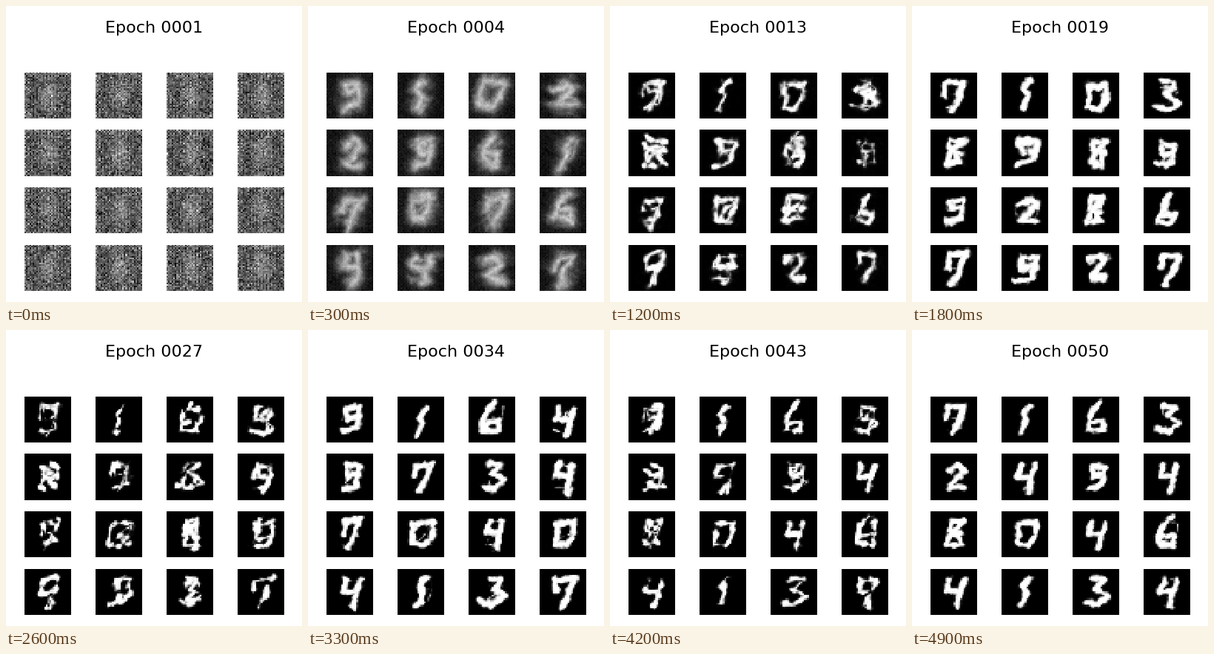
These frames come from a looping animation (400 px wide and 400 px high, 5.1 s). A matplotlib script:

```python
import matplotlib.pyplot as plt
import numpy as np
from matplotlib.animation import FuncAnimation

STAGE, DPI = 400, 100
EPOCHS, STEP_MS = 50, 100
N, CELLS, SIDE = 28, 16, 62.5

# Pen strokes of each digit on the 28 x 28 canvas, leaning like handwriting.
DIGITS = {
    "0": [[(10, 8), (21, 7), (20, 15), (16, 21), (9, 20), (10, 8)]],
    "1": [[(17, 6), (13, 11), (15, 15), (12, 22)]],
    "2": [[(11, 10), (17, 7), (20, 10), (11, 20), (20, 20)]],
    "3": [[(12, 6), (19, 7), (14, 12), (21, 17), (15, 22), (8, 20)]],
    "4": [[(12, 7), (10, 14), (18, 14)], [(20, 7), (16, 23)]],
    "6": [[(16, 4), (10, 12), (9, 20), (18, 21), (18, 15), (11, 16)]],
    "7": [[(10, 14), (11, 7), (21, 6), (17, 16), (13, 23)]],
    "8": [[(18, 14), (12, 12), (13, 7), (20, 7), (13, 14), (10, 21), (18, 20), (16, 14)]],
    "9": [[(20, 8), (12, 8), (13, 14), (19, 12)], [(20, 8), (18, 19), (10, 21)]],
}

# What the sixteen cells resemble as training goes on.
STAGES = {8: "9102296170764427", 19: "7103898992867927",
          34: "9164973470404137", 50: "7163249480464134"}

gx, gy = np.meshgrid(np.arange(N) + 0.5, np.arange(N) + 0.5)


def distance(digit, x, y):
    """Distance from the points (x, y) to the nearest stroke of a digit."""
    best = np.full_like(x, 99.0)
    for stroke in DIGITS[digit]:
        for (ax, ay), (bx, by) in zip(stroke, stroke[1:]):
            dx, dy = bx - ax, by - ay
            t = np.clip(((x - ax) * dx + (y - ay) * dy) / (dx * dx + dy * dy), 0, 1)
            best = np.minimum(best, np.hypot(x - ax - t * dx, y - ay - t * dy))
    return best


def ripple(rng, epoch, scale):
    """A smooth random field that drifts slowly with the epoch."""
    field = 0
    for _ in range(3):
        kx, ky = rng.normal(0, scale, 2)
        phase, speed = rng.uniform(0, 2 * np.pi), rng.normal(0, 0.25)
        field = field + np.sin(kx * gx + ky * gy + phase + speed * epoch)
    return field / 1.7


def grain(rng):
    """Fine noise, slightly blurred."""
    a = rng.normal(0, 1, (N, N))
    for axis in (0, 1):
        a = (np.roll(a, 1, axis) + 2 * a + np.roll(a, -1, axis)) / 4
    return a


def static(rng):
    """Untrained output: a bright middle, a pale checked rim and grain."""
    col, row = np.cos(np.pi * (gx - 0.5)), np.cos(np.pi * (gy - 0.5))
    glow = np.exp(-((gx - 15) / 5.5) ** 2 - ((gy - 14) / 10) ** 2)
    rim = np.exp(-np.minimum(gx, gy) / 1.5) + 0.5 * np.exp(-np.minimum(N - gx, N - gy))
    base = 0.31 + 0.24 * glow + 0.2 * rim + 0.04 * col + (0.04 + 0.1 * rim) * col * row
    return base + rng.normal(0, 0.12, (N, N))


def image(cell, epoch):
    shape, fine = np.random.default_rng(cell), np.random.default_rng([cell, epoch])
    early = max(0, 8 - epoch) / 7
    thin = 0.5 - 0.5 * np.cos(2 * np.pi * (epoch - 19) / 17)   # the pen swells and thins

    # Bend the canvas, less and less as training settles.
    bend = 0.4 + 1.3 * (1 - epoch / EPOCHS)
    x = gx + bend * ripple(shape, epoch, 0.2)
    y = gy + bend * ripple(shape, epoch, 0.2)

    # One digit wears away while the next one grows.
    marks = list(STAGES)
    start, end = next((a, b) for a, b in zip(marks, marks[1:]) if epoch <= b)
    mix = np.clip((epoch - start) / (end - start), 0, 1)
    dist = np.minimum(distance(STAGES[start][cell], x, y) + 2 * mix ** 2,
                      distance(STAGES[end][cell], x, y) + 2 * (1 - mix) ** 2)

    gaps = (0.2 + 0.6 * thin) * ripple(shape, epoch, 0.5)
    rough = grain(fine)
    width = 1.9 - 0.4 * thin + 0.8 * early
    soft = 0.22 + 0.35 * np.exp(-max(0, epoch - 8) / 5) + 2 * early
    edge = (dist + gaps + 0.9 * rough - width) / soft
    img = 1 / (1 + np.exp(np.clip(edge, -40, 40)))

    haze = 0.2 * np.exp(-abs(epoch - 8) / 5)
    img = img + haze * np.abs(rough) * np.exp(-dist / 4) * (0.5 + gx / N)
    noise = early ** 3
    return np.clip((1 - noise) * img + noise * static(fine), 0, 1)


fig = plt.figure(figsize=(STAGE / DPI, STAGE / DPI), dpi=DPI, facecolor="white")
title = fig.text(0.5, 0.95, "", ha="center", va="top", fontsize=16,
                 family="DejaVu Sans")
pictures = []
for i in range(CELLS):
    cx, cy = 56.5 + 96 * (i % 4), 121 + 77.6 * (i // 4)
    ax = fig.add_axes([(cx - SIDE / 2) / STAGE, 1 - (cy + SIDE / 2) / STAGE,
                       SIDE / STAGE, SIDE / STAGE])
    ax.axis("off")
    pictures.append(ax.imshow(np.zeros((N, N)), cmap="gray", vmin=0, vmax=1,
                              interpolation="nearest"))


def update(frame):
    epoch = min(frame + 1, EPOCHS)           # the last epoch is held one step longer
    title.set_text(f"Epoch {epoch:04d}")
    for cell, picture in enumerate(pictures):
        picture.set_data(image(cell, epoch))
    return [title, *pictures]


anim = FuncAnimation(fig, update, frames=EPOCHS + 1, interval=STEP_MS,
                     repeat=True, repeat_delay=0)
plt.show()
```
